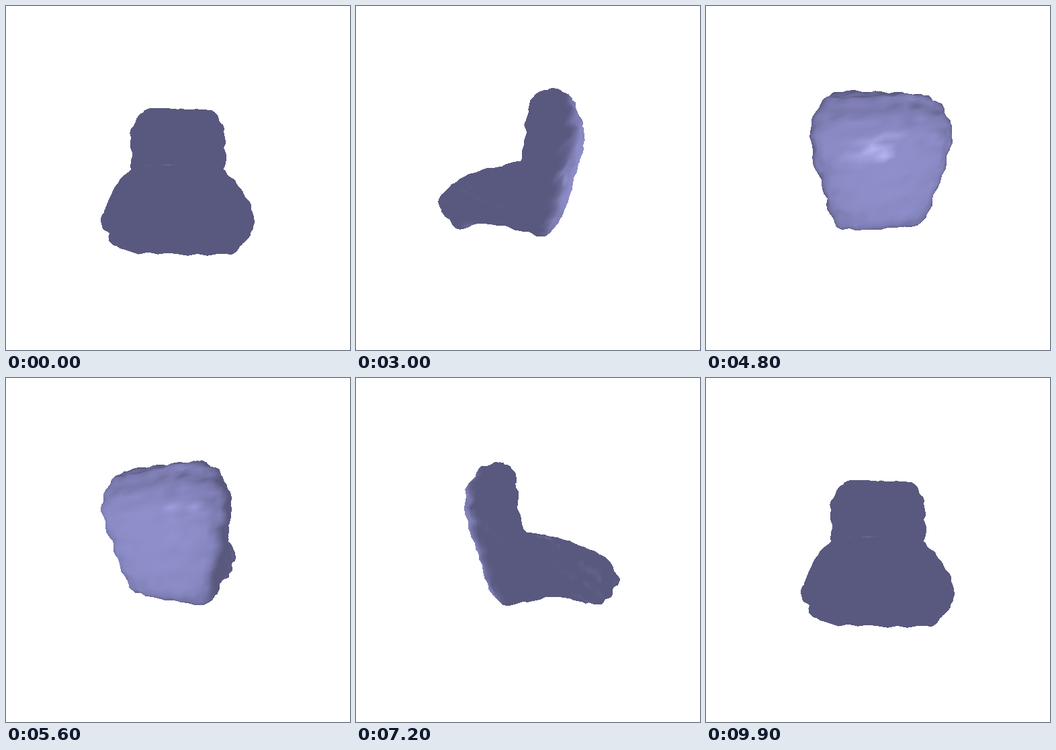
An HTML page with a canvas that plays this animation: 512x512 px, repeating every 10000 ms.

```html
<!DOCTYPE html>
<html lang="en">
<head>
<meta charset="utf-8">
<title>Turntable</title>
<style>
  html, body { margin: 0; width: 100%; height: 100%; overflow: hidden; background: #fff; }
  canvas { display: block; width: 512px; height: 512px; }
</style>
</head>
<body>
<canvas id="stage" width="512" height="512"></canvas>
<script>
const SIZE = 512, FOCAL = 256, DIST = 100, ELEV = Math.PI / 18;
const FRAMES = 100, STEP_MS = 100;
const COLOR = [0.7, 0.7, 1], AMBIENT = 0.5, DIFFUSE = 0.3, SPECULAR = 0.2, SHININESS = 64;

// Stations from the top of the back to the front of the seat:
// inner z, inner y, outer z, outer y, half width
const stations = [
  [-11, 40, -18, 41, 18.5],
  [-8.5, 38, -23, 39, 22],
  [-7.5, 34, -25, 36, 25.5],
  [-7, 29, -28.5, 29, 29],
  [-6.5, 20, -29.5, 22, 30],
  [-4.5, 13.5, -28.5, 14, 30],
  [-1, 9.5, -26, 4, 28.8],
  [3, 8.5, -24, -6, 27.5],
  [7, 8, -21.5, -16, 26.5],
  [11, 7.8, -16, -24, 26],
  [15, 7, -6, -23.5, 26],
  [21, 5.5, 7, -22, 26.5],
  [27, 3.5, 17, -23, 27],
  [32, 1, 25, -25.5, 27.5],
  [37, -3, 31, -27.5, 27.5],
  [39.5, -8, 35.5, -24, 27],
  [39, -11, 38, -19, 24]
];
const LAST = stations.length - 1, PER = 3, SIDE = 12;
const ROWS = (LAST + 2) * PER + 1, COLS = SIDE * 4, COUNT = ROWS * COLS;

function station(s) {
  const i = Math.min(Math.floor(s), LAST - 1), t = s - i;
  const at = k => stations[Math.max(0, Math.min(LAST, k))];
  const a = at(i - 1), b = at(i), c = at(i + 1), d = at(i + 2);
  return b.map((p, k) => p + 0.5 * t * (c[k] - a[k] +
    t * (2 * a[k] - 5 * p + 4 * c[k] - d[k] + t * (3 * (p - c[k]) + d[k] - a[k]))));
}

// Point on a rounded square, q in 0..4
function ringPoint(q) {
  const side = Math.floor(q), t = 2 * (q - side) - 1;
  const [a, b] = [[t, 1], [1, -t], [-t, -1], [-1, t]][side];
  const n = Math.pow(Math.abs(a) ** 5 + Math.abs(b) ** 5, 0.2);
  return [a / n, b / n];
}

function buildBody() {
  const pos = new Float32Array(COUNT * 3);
  for (let i = 0; i < ROWS; i++) {
    const s = i / PER - 1;
    const shrink = 1 - Math.max(0, -s, s - LAST);
    const [fz, fy, bz, by, w] = station(Math.max(0, Math.min(LAST, s)));
    const taper = 0.1 * Math.max(0, Math.min(1, fz / 25));
    for (let j = 0; j < COLS; j++) {
      const [a, b] = ringPoint(j / SIDE), k = (i * COLS + j) * 3;
      const x = a * w * shrink * (1 + taper * b);
      const z = (fz + bz) / 2 + b * shrink * (fz - bz) / 2;
      pos[k] = x;
      pos[k + 1] = (fy + by) / 2 + b * shrink * (fy - by) / 2 - 0.02 * x * Math.max(0, z) / 30;
      pos[k + 2] = z;
    }
  }
  return pos;
}

function normals(pos) {
  const out = new Float32Array(COUNT * 3);
  for (let i = 0; i < ROWS; i++) {
    const up = Math.max(0, i - 1) * COLS, down = Math.min(ROWS - 1, i + 1) * COLS;
    for (let j = 0; j < COLS; j++) {
      const u0 = (up + j) * 3, u1 = (down + j) * 3;
      const v0 = (i * COLS + (j + COLS - 1) % COLS) * 3, v1 = (i * COLS + (j + 1) % COLS) * 3;
      const d = (p, q, c) => pos[q + c] - pos[p + c];
      const ux = d(u0, u1, 0), uy = d(u0, u1, 1), uz = d(u0, u1, 2);
      const vx = d(v0, v1, 0), vy = d(v0, v1, 1), vz = d(v0, v1, 2);
      const nx = uy * vz - uz * vy, ny = uz * vx - ux * vz, nz = ux * vy - uy * vx;
      const len = Math.hypot(nx, ny, nz) || 1, k = (i * COLS + j) * 3;
      out[k] = nx / len;
      out[k + 1] = ny / len;
      out[k + 2] = nz / len;
    }
  }
  return out;
}

function wrinkle(pos) {
  const nor = normals(pos);
  let seed = 7;
  const random = () => (seed = seed * 16807 % 2147483647) / 2147483647;
  for (let k = 0; k < pos.length; k += 3) {
    const x = pos[k], y = pos[k + 1], z = pos[k + 2];
    const h = Math.abs(Math.sin(0.36 * y + 0.8 * Math.sin(0.13 * x) + 0.22 * z)) +
      0.8 * Math.abs(Math.sin(0.33 * x + 0.9 * Math.sin(0.2 * y)));
    const lift = 1.2 * (h - 1.2) + 0.9 * (random() - 0.5);
    for (let c = 0; c < 3; c++) pos[k + c] += nor[k + c] * lift;
  }
  return pos;
}

const pos = wrinkle(buildBody()), nor = normals(pos);
const ctx = document.getElementById("stage").getContext("2d");
const image = ctx.createImageData(SIZE, SIZE), pixels = image.data;
const depth = new Float32Array(SIZE * SIZE);
const sx = new Float32Array(COUNT), sy = new Float32Array(COUNT), inv = new Float32Array(COUNT);
const diffuse = new Float32Array(COUNT), shine = new Float32Array(COUNT);

function project(angle) {
  const sa = Math.sin(angle), ca = Math.cos(angle), se = Math.sin(ELEV), ce = Math.cos(ELEV);
  const eye = [DIST * ce * sa, DIST * se, DIST * ce * ca];
  for (let i = 0, k = 0; i < COUNT; i++, k += 3) {
    const x = pos[k], y = pos[k + 1], z = pos[k + 2];
    const toward = x * sa + z * ca;
    const w = 1 / (DIST - toward * ce - y * se);
    sx[i] = SIZE / 2 + FOCAL * (x * ca - z * sa) * w;
    sy[i] = SIZE / 2 - FOCAL * (y * ce - toward * se) * w;
    inv[i] = w;

    // The lamp stays fixed behind the back
    const nx = nor[k], ny = nor[k + 1], nz = nor[k + 2];
    const lz = -DIST - z, ll = Math.hypot(x, y, lz);
    const lit = (-x * nx - y * ny + lz * nz) / ll;
    diffuse[i] = Math.max(0, lit);
    shine[i] = 0;
    if (lit > 0) {
      const ex = eye[0] - x, ey = eye[1] - y, ez = eye[2] - z;
      const rx = 2 * lit * nx + x / ll, ry = 2 * lit * ny + y / ll, rz = 2 * lit * nz - lz / ll;
      const m = (rx * ex + ry * ey + rz * ez) / Math.hypot(ex, ey, ez);
      shine[i] = Math.pow(Math.max(0, m), SHININESS);
    }
  }
}

function triangle(a, b, c) {
  const ax = sx[a], ay = sy[a], bx = sx[b], by = sy[b], cx = sx[c], cy = sy[c];
  const area = (bx - ax) * (cy - ay) - (by - ay) * (cx - ax);
  if (Math.abs(area) < 1e-6) return;
  const x0 = Math.ceil(Math.min(ax, bx, cx) - 0.5), x1 = Math.floor(Math.max(ax, bx, cx) - 0.5);
  const y0 = Math.ceil(Math.min(ay, by, cy) - 0.5), y1 = Math.floor(Math.max(ay, by, cy) - 0.5);
  for (let y = y0; y <= y1; y++) {
    for (let x = x0; x <= x1; x++) {
      const px = x + 0.5, py = y + 0.5;
      const u = ((bx - px) * (cy - py) - (by - py) * (cx - px)) / area;
      const v = ((cx - px) * (ay - py) - (cy - py) * (ax - px)) / area;
      const w = 1 - u - v;
      if (u < -1e-5 || v < -1e-5 || w < -1e-5) continue;
      const near = u * inv[a] + v * inv[b] + w * inv[c], p = y * SIZE + x;
      if (near <= depth[p]) continue;
      depth[p] = near;
      const light = AMBIENT + DIFFUSE * (u * diffuse[a] + v * diffuse[b] + w * diffuse[c]);
      const gloss = SPECULAR * (u * shine[a] + v * shine[b] + w * shine[c]);
      for (let i = 0; i < 3; i++) pixels[p * 4 + i] = 255 * (COLOR[i] * light + gloss);
    }
  }
}

function render(frame) {
  pixels.fill(255);
  depth.fill(0);
  project(frame / (FRAMES - 1) * 2 * Math.PI);
  for (let i = 0; i < ROWS - 1; i++) {
    for (let j = 0; j < COLS; j++) {
      const a = i * COLS + j, b = i * COLS + (j + 1) % COLS;
      triangle(a, b, a + COLS);
      triangle(b, b + COLS, a + COLS);
    }
  }
  ctx.putImageData(image, 0, 0);
}

let shown = -1;
function tick() {
  const frame = Math.floor(performance.now() / STEP_MS) % FRAMES;
  if (frame !== shown) render(shown = frame);
  requestAnimationFrame(tick);
}
tick();
</script>
</body>
</html>
```
